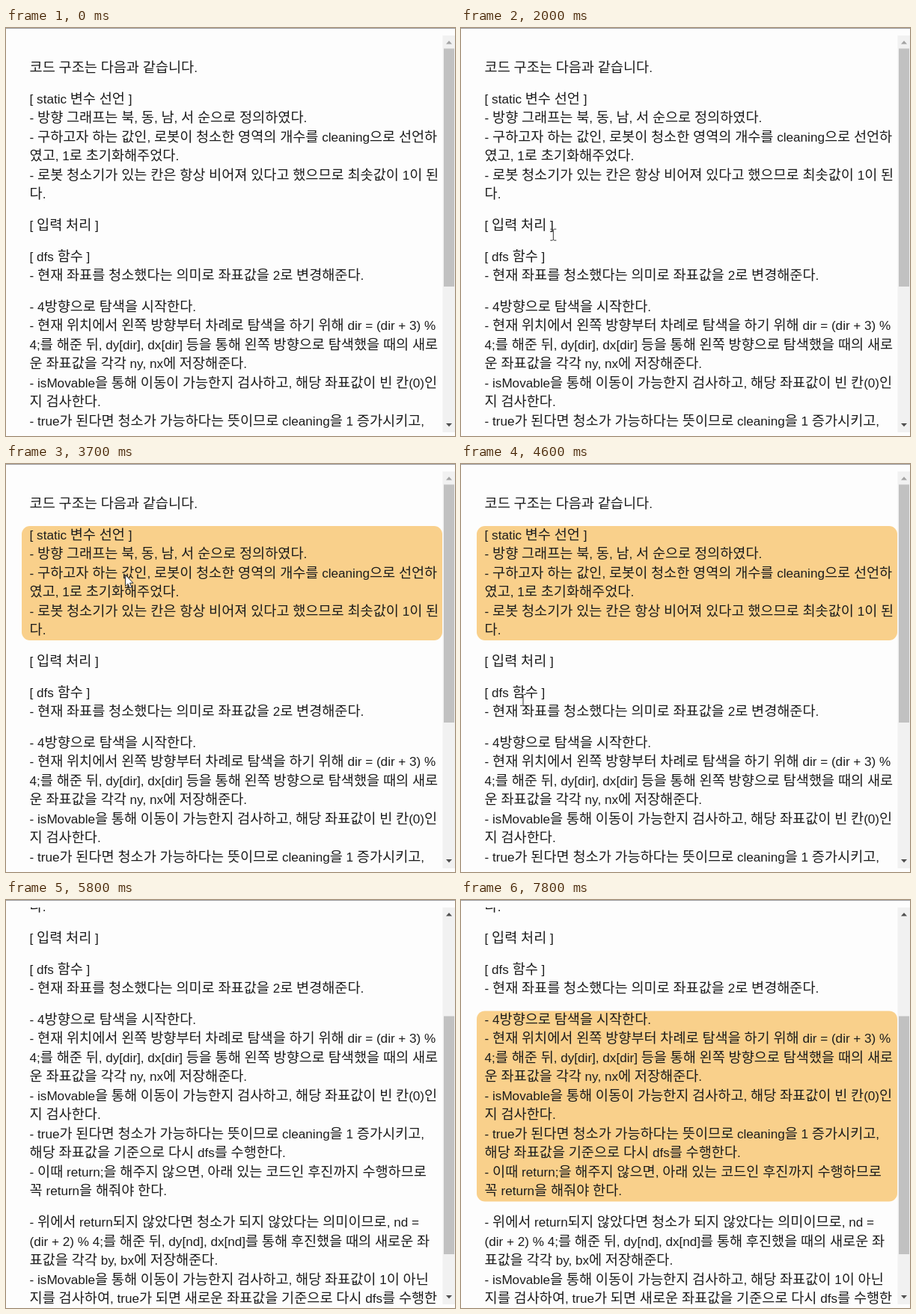
Recreate the animation shown at these times as an HTML page. Size 600 by 546 pixels, loop 7.9 s.

```html
<!DOCTYPE html>
<html lang="ko">
<head>
<meta charset="utf-8">
<style>
html, body { margin: 0; width: 100%; height: 100%; overflow: hidden; background: #fdfdfd; }
#stage { position: relative; width: 600px; height: 546px; overflow: hidden; }
#rule { position: absolute; width: 600px; height: 1px; background: #9c9c9f; }
#view { position: absolute; top: 10px; width: 600px; height: 531px; overflow: hidden; }
#page { position: absolute; left: 21px; top: 31.2px; width: 562px; }
section { margin: 0 0 16.2px; padding-left: 10.6px; border-radius: 11px; white-space: pre;
  font: 17.1px/25.5px "Liberation Sans", Arial, sans-serif; color: #1c1c1c; }
section div { height: 25.5px; }
section span { font: 18.6px/0 "Noto Sans CJK KR", "Noto Sans CJK", sans-serif; }
svg { position: absolute; left: 0; top: 0; }
</style>
</head>
<body>
<div id="stage">
  <div id="rule"></div>
  <div id="view"><div id="page"></div></div>
  <svg width="600" height="546">
    <rect x="583.5" y="10" width="17" height="531" fill="#f1f1f1"/>
    <rect id="thumb" x="585" y="27.5" width="14" height="318.5" fill="#c1c1c1"/>
    <path id="up" d="M588 21.5l4-4.5 4 4.5z"/>
    <path d="M588 529l4 4.5 4-4.5z" fill="#505050"/>
    <path id="arrow" d="M.5 .5V15.5L4 12.3L6.3 17.8L8.8 16.8L6.5 11.3H11Z" fill="#fff" stroke="#333"/>
    <path id="beam" d="M-4-7.5h3l1 1 1-1h3M0-6.5V6.5M-4 7.5h3l1-1 1 1h3" fill="none" stroke="#333"/>
  </svg>
</div>
<script>
const LOOP = 7900, STEP = 100, SCROLL = 212.6;
const GRAY = '#e3e2e4', ORANGE = '#f9d08b';
const FIRST = 1, SECOND = 4; // paragraphs that react to the pointer

const text = `코드 구조는 다음과 같습니다.

[ static 변수 선언 ]
- 방향 그래프는 북, 동, 남, 서 순으로 정의하였다.
- 구하고자 하는 값인, 로봇이 청소한 영역의 개수를 cleaning으로 선언하
였고, 1로 초기화해주었다.
- 로봇 청소기가 있는 칸은 항상 비어져 있다고 했으므로 최솟값이 1이 된
다.

[ 입력 처리 ]

[ dfs 함수 ]
- 현재 좌표를 청소했다는 의미로 좌표값을 2로 변경해준다.

- 4방향으로 탐색을 시작한다.
- 현재 위치에서 왼쪽 방향부터 차례로 탐색을 하기 위해 dir = (dir + 3) %
4;를 해준 뒤, dy[dir], dx[dir] 등을 통해 왼쪽 방향으로 탐색했을 때의 새로
운 좌표값을 각각 ny, nx에 저장해준다.
- isMovable을 통해 이동이 가능한지 검사하고, 해당 좌표값이 빈 칸(0)인
지 검사한다.
- true가 된다면 청소가 가능하다는 뜻이므로 cleaning을 1 증가시키고,
해당 좌표값을 기준으로 다시 dfs를 수행한다.
- 이때 return;을 해주지 않으면, 아래 있는 코드인 후진까지 수행하므로
꼭 return을 해줘야 한다.

- 위에서 return되지 않았다면 청소가 되지 않았다는 의미이므로, nd =
(dir + 2) % 4;를 해준 뒤, dy[nd], dx[nd]를 통해 후진했을 때의 새로운 좌
표값을 각각 by, bx에 저장해준다.
- isMovable을 통해 이동이 가능한지 검사하고, 해당 좌표값이 1이 아닌
지를 검사하여, true가 되면 새로운 좌표값을 기준으로 다시 dfs를 수행한`;

const $ = id => document.getElementById(id);
const page = $('page');
page.innerHTML = text.split('\n\n').map(par => '<section>' + par.split('\n').map(line =>
  '<div>' + line.replace(/[가-힣]+/g, '<span>$&</span>') + '</div>').join('') + '</section>').join('');
const pars = [...page.children];

// Pointer visits: [time, x, y]
const visits = [
  [[1400, 24, 381], [1600, 66, 392], [1900, 110, 320], [2200, 150, 190], [2600, 159, 148],
   [3700, 159, 148], [4100, 128, 190], [4500, 83, 316], [4700, 83, 316], [5000, 160, 372],
   [5200, 218, 386], [5600, 218, 386]],
  [[6200, 588, 330], [6500, 420, 290], [6900, 420, 290], [7100, 592, 330]]
];

function pointer(t) {
  const keys = visits.find(v => t >= v[0][0] && t <= v[v.length - 1][0]);
  if (!keys) return null;
  const i = Math.max(1, keys.findIndex(k => k[0] >= t));
  const [a, b] = [keys[i - 1], keys[i]];
  const u = (t - a[0]) / (b[0] - a[0]);
  return { x: a[1] + (b[1] - a[1]) * u, y: a[2] + (b[2] - a[2]) * u };
}

function scrollAt(t) {
  const u = Math.min(1, Math.max(0, (t - 5210) / 480));
  return SCROLL * (u < .5 ? 2 * u * u : 1 - 2 * (1 - u) ** 2);
}

function under(pos, scroll) {
  if (!pos || pos.x < 21 || pos.x > 583) return -1;
  const y = pos.y - 41.2 + scroll;
  return pars.findIndex(p => y >= p.offsetTop && y < p.offsetTop + p.offsetHeight);
}

function place(el, pos, show) {
  el.style.display = show ? '' : 'none';
  if (show) el.setAttribute('transform', `translate(${pos.x} ${pos.y})`);
}

function draw(now) {
  const t = Math.floor(now % LOOP / STEP) * STEP;
  const scroll = scrollAt(t), pos = pointer(t);
  const hover = under(pointer(t - STEP), scroll);
  const pinned = t >= 3600 && t < 5000 ? FIRST : t >= 6800 ? SECOND : -1;

  page.style.transform = `translateY(${-scroll}px)`;
  for (const i of [FIRST, SECOND])
    pars[i].style.background = i === pinned ? ORANGE : i === hover ? GRAY : '';
  $('thumb').setAttribute('y', 27.5 + scroll * .602);
  $('up').setAttribute('fill', scroll ? '#505050' : '#a3a3a3');

  const beam = [0, 2, 3].includes(under(pos, scroll));
  place($('arrow'), pos, pos && !beam);
  place($('beam'), pos, pos && beam);
  requestAnimationFrame(() => draw(performance.now() - start));
}

const start = performance.now();
draw(0);
</script>
</body>
</html>
```
